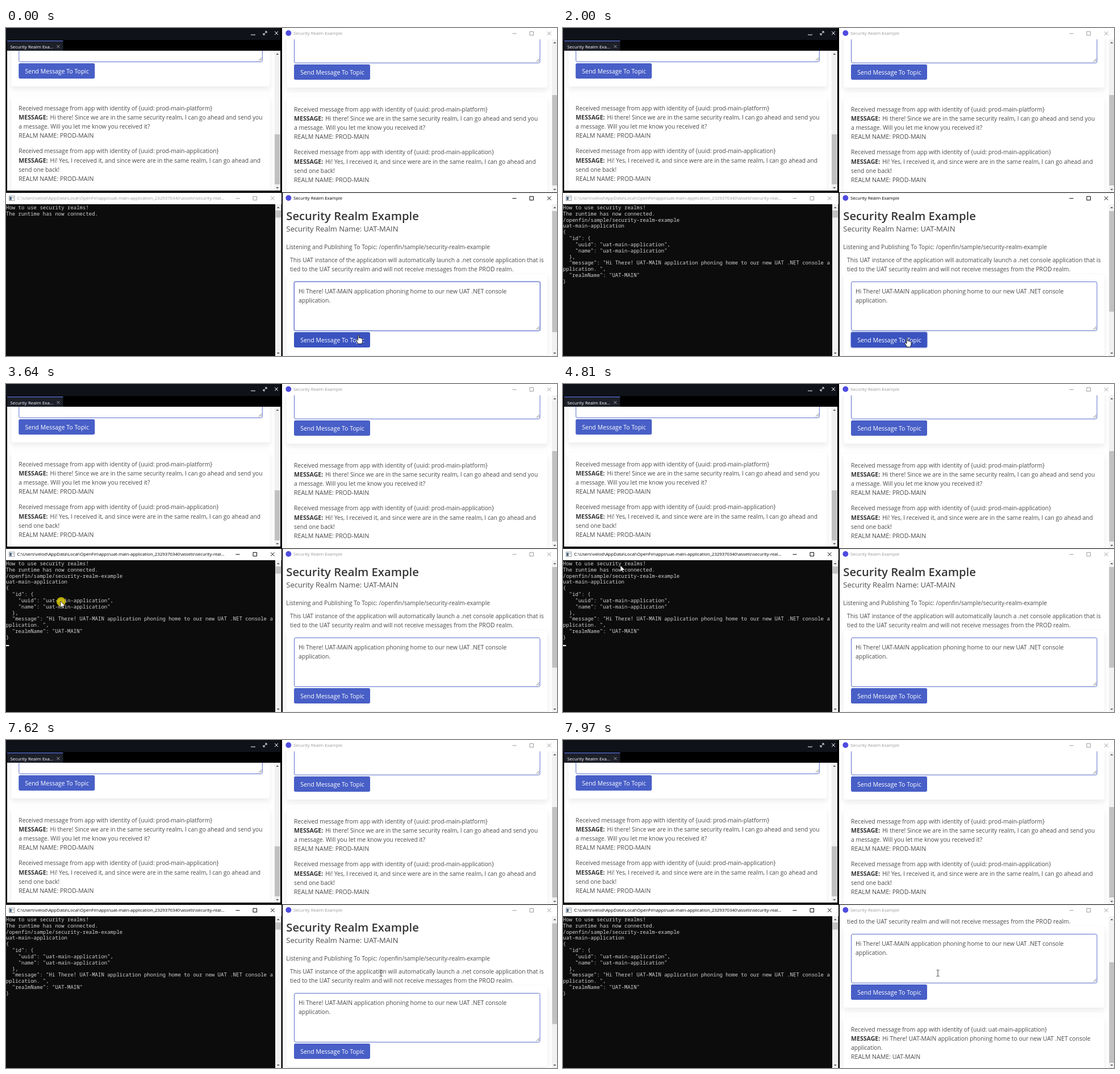
Animation, 970 px wide and 577 px high, one loop 8000 ms. Source, as an HTML page:

```html
<!DOCTYPE html>
<html lang="en">
<head>
<meta charset="utf-8">
<title>Security realms</title>
<style>
  html, body { margin: 0; width: 100%; height: 100%; overflow: hidden; background: #000; }
  svg { display: block; width: 100vw; height: 100vh; }
  text { font: 10.27px 'Open Sans', 'Noto Sans', sans-serif; font-variant-ligatures: none; fill: #4a4a4a; white-space: pre; }
  .wide { font-size: 10.4px; }
  .caps { font-size: 10.6px; }
  .strong { font-size: 10.6px; font-weight: 700; fill: #363636; }
  .h1 { font-size: 20.2px; font-weight: 600; fill: #363636; }
  .h2 { font-size: 13px; }
  .bar { font-size: 7.73px; }
  .tab { font-size: 7.9px; font-weight: 500; fill: #fff; }
  .label { font-size: 10.5px; fill: #fff; }
  .mono { font: 9px 'Noto Sans Mono', 'Liberation Mono', monospace; fill: #d2d2d2; }
  .card { fill: #fff; stroke: rgba(10,10,10,.02); filter: drop-shadow(0 5px 5px rgba(10,10,10,.08)); }
  .box { fill: #fff; stroke: #5a6fcd; }
  .line { fill: none; stroke-width: 1; }
</style>
</head>
<body>
<svg id="stage" viewBox="0 0 970 577"></svg>
<script>
const LOOP = 8000;
const SENT = 1000, ACTIVATE = 3370;
const stage = document.getElementById('stage');

const text = (x, y, s, cls = '') => `<text x="${x}" y="${y}" class="${cls}">${s}</text>`;
const rect = (x, y, w, h, fill, more = '') =>
  `<rect x="${x}" y="${y}" width="${w}" height="${h}" fill="${fill}" ${more}/>`;
const path = (d, more = '') => `<path d="${d}" ${more}/>`;
const clip = (id, x, y, w, h) => `<clipPath id="${id}">${rect(x, y, w, h, '#000')}</clipPath>`;

function scrollbar(x, w, top, bottom, thumbY, thumbH, id = '') {
  const c = x + w / 2;
  const arrow = (y, d) => path(`M${c - 2.5} ${y + d}h5l-2.5 ${-2.6 * d}z`, 'fill="#505050"');
  return rect(x, top, w, bottom - top, '#f1f1f1')
    + arrow(top + 6, 1) + arrow(bottom - 5, -1)
    + rect(x + .5, thumbY, w - 1, thumbH, '#c1c1c1', id && `id="${id}"`);
}

function controls(x, y) {
  return path(`M${x - 3.5} ${y + .5}h7M${x + 27} ${y - 3}h6.5v6.5h-6.5z`
    + `M${x + 58} ${y - 3}l6.5 6.5m0-6.5l-6.5 6.5`, 'class="line"');
}

function titleBar(id, x, y, w, title, icon, cx) {
  return rect(x, y, w, 20, '#fff') + icon
    + `<g id="${id}">${text(title[0], y + 12.4, title[1], 'bar')}${controls(cx, y + 9.3)}</g>`;
}

const realmBar = (id, x, y) => titleBar(id, x, y, 970 - x, [506, 'Security Realm Example'],
  `<circle cx="497.3" cy="${y + 9}" r="5" fill="#4f4ce0"/>`, 895);

function message(x, y, from, lines, realm) {
  const row = i => y + 16.2 * i;
  return text(x, row(0), `Received message from app with identity of {uuid: ${from}}`)
    + text(x, row(1), 'MESSAGE:', 'strong')
    + text(x + 55.3, row(1), lines[0], lines[2] || '')
    + text(x, row(2), lines[1])
    + text(x, row(3), `REALM NAME: ${realm}`, 'caps');
}

// Form card with the message card below; y is the top of the text area.
function form(x, y, w, content, ids = false) {
  const right = x + w, end = y + 86;
  return `<rect class="card" x="${x - 13}" y="${y - 13}" width="${w + 26}" height="143" rx="4"/>`
    + `<rect class="card" x="${x - 13}" y="${y + 147}" width="${w + 26}" height="230" rx="4"/>`
    + (ids ? rect(x, y, w, 86.5, 'none', 'id="areaRing" rx="2.5" stroke="#485fc7" stroke-opacity=".3" stroke-width="2.6"') : '')
    + `<rect class="box" x="${x + .5}" y="${y + .5}" width="${w - 1}" height="86" rx="2.5"/>`
    + path(`M${right - 7} ${end - 1.5}l5.5-5.5M${right - 4} ${end - 1.5}l2.5-2.5`, 'class="line" stroke="#777"')
    + rect(x, y + 89, 134, 27, '#485fc7', `rx="2.7" ${ids ? 'id="button"' : ''}`)
    + text(x + 11.2, y + 106.7, 'Send Message To Topic', 'label')
    + content;
}

const prodMessages = (x, y) =>
  message(x, y, 'prod-main-platform', [
    'Hi there! Since we are in the same security realm, I can go ahead and send you',
    'a message. Will you let me know you received it?'], 'PROD-MAIN')
  + message(x, y + 75.7, 'prod-main-application', [
    'Hi! Yes, I received it, and since were are in the same realm, I can go ahead and',
    'send one back!'], 'PROD-MAIN');

const platformWindow = () =>
  rect(0, 0, 483, 21, '#10121a') + rect(2, 22, 98.5, 18, '#1d1f29') + rect(2, 22, 98.5, 1.3, '#5a70d8')
  + text(7.5, 35.6, 'Security Realm Exa...', 'tab')
  + path('M89.5 30l5 5m0-5l-5 5', 'class="line" stroke="#bbb" style="stroke-width:.8"')
  + path('M431 12h8M473 6l6 6m0-6l-6 6M453 12l6-6M456 6h3v3M453 9v3h3', 'class="line" stroke="#fff"')
  + rect(2, 40, 481, 246, '#fff')
  + `<g clip-path="url(#cTL)">${form(22.3, -27, 429.5, prodMessages(22.3, 144.7))}</g>`
  + scrollbar(472.5, 10.5, 40, 286, 187, 88);

const appWindow = () =>
  rect(486, 20, 484, 269, '#fff')
  + `<g clip-path="url(#cTR)">${form(507, -25, 433.5, prodMessages(507, 146.7))}</g>`
  + scrollbar(961, 10, 20, 289, 118, 159)
  + realmBar('barTR', 486, 0);

const greeting = 'Hi There! UAT-MAIN application phoning home to our new UAT .NET console';

const uatWindow = () =>
  rect(487, 310, 483, 267, '#fff')
  + `<g clip-path="url(#cBR)"><g id="page">`
  + form(507, 446, 433.5,
      text(515, 466.5, greeting, 'wide') + text(515, 482.7, 'application.', 'wide')
      + rect(571.5, 472, 1, 13, '#333', 'id="caret"')
      + message(507, 617.7, 'uat-main-application', [greeting, 'application.', 'wide'], 'UAT-MAIN'), true)
  + text(493.3, 337.6, 'Security Realm Example', 'h1')
  + text(493.3, 358.2, 'Security Realm Name: UAT-MAIN', 'h2')
  + text(493.3, 389.2, 'Listening and Publishing To Topic: /openfin/sample/security-realm-example')
  + text(500, 412.2, 'This UAT instance of the application will automatically launch a .net console application that is')
  + text(500, 428.4, 'tied to the UAT security realm and will not receive messages from the PROD realm.')
  + `</g></g>`
  + scrollbar(961, 10, 310, 577, 322, 213, 'thumb')
  + realmBar('barBR', 487, 290);

const output = [
  '/openfin/sample/security-realm-example', 'uat-main-application', '{', '  "id": {',
  '    "uuid": "uat-main-application",', '    "name": "uat-main-application"', '  },',
  '  "message": "Hi There! UAT-MAIN application phoning home to our new UAT .NET console a',
  'pplication. ",', '  "realmName": "UAT-MAIN"', '}'];
const print = (lines, first) =>
  lines.map((s, i) => text(0, 319 + 10.83 * (i + first), s, 'mono')).join('');

const consoleWindow = () =>
  rect(0, 310, 474, 267, '#0c0c0c')
  + print(['How to use security realms!', 'The runtime has now connected.'], 0)
  + `<g id="output">${print(output, 2)}</g>`
  + rect(0, 459, 5.4, 2.2, '#f2f2f2', 'id="cursor"')
  + scrollbar(474, 10.5, 310, 577, 321, 12.5)
  + titleBar('barBL', 0, 290, 485,
      [19.5, String.raw`C:\Users\velod\AppData\Local\OpenFin\apps\uat-main-application_2329370340\assets\security-real...`],
      rect(5.5, 295.5, 9.5, 8, '#f4f4f4', 'stroke="#8a8f96" stroke-width=".8"')
      + rect(6.5, 297, 3.2, 5.5, '#3e5a78') + rect(10.5, 298, 3.5, 1, '#9aa'), 408);

const pointers =
  path('M0 0V17L4 13.2L6.6 19.2L9 18.2L6.5 12.3H12Z',
    'id="arrow" transform="scale(.68)" fill="#fff" stroke="#000"')
  + path('M6 1.5c0-2 3-2 3 0V8c.5-1.5 3-1 3 .5 .5-1.2 3-.8 3 .8 .7-1 3-.5 3 1.2V16c0 3-1.5 4-2 7H7c-.5-2-3.5-5.5-5.5-8.5C.5 12 3 11 4 12.5L6 14.5Z',
    'id="hand" transform="scale(.68) translate(-7.5)" fill="#fff" stroke="#000" stroke-width="1.3"')
  + path('M-2.5-5.3h1.6l.9.8l.9-.8h1.6M0-4.5V4.7M-2.5 5.5h1.6l.9-.8l.9.8h1.6',
    'id="beam" class="line" stroke="#444"');

stage.innerHTML =
  `<defs>${clip('cTL', 2, 40, 470.5, 246)}${clip('cTR', 486, 20, 475, 269)}${clip('cBR', 487, 310, 474, 267)}</defs>`
  + rect(0, 0, 970, 577, '#000')
  + platformWindow() + appWindow() + consoleWindow() + uatWindow()
  + `<g id="mouse"><circle id="press" cx="1" cy="1" r="8" fill="#e6d200" fill-opacity=".8"/>${pointers}</g>`;

// time, x, y, pointer shape
const track = [
  [0, 620.5, 540, 'hand'], [70, 620.5, 540, 'hand'], [340, 618.5, 546, 'hand'],
  [1990, 618.5, 546, 'hand'], [2000, 606.5, 546, 'hand'], [2070, 560, 511, 'beam'],
  [2150, 528, 485, 'beam'], [2400, 528, 485, 'arrow'], [2550, 254, 462, 'arrow'],
  [2740, 254, 462, 'arrow'], [3000, 165, 425, 'arrow'], [3370, 96, 382, 'arrow'],
  [3700, 96, 382, 'arrow'], [3950, 100, 358, 'arrow'], [4270, 98, 344, 'arrow'],
  [4530, 98, 344, 'arrow'], [4700, 101, 325, 'arrow'], [4810, 101, 319, 'arrow'],
  [5290, 101, 314, 'arrow'], [5490, 101, 314, 'arrow'], [5910, 122.5, 400, 'arrow'],
  [6060, 140, 410, 'arrow'], [6260, 130, 346, 'arrow'], [6330, 130, 346, 'arrow'],
  [6610, 170, 464, 'arrow'], [6870, 170, 464, 'arrow'], [6950, 466, 464, 'arrow'],
  [7210, 466, 464, 'beam'], [7290, 660, 410, 'beam'], [LOOP, 660, 410, 'beam']];

const el = {};
stage.querySelectorAll('[id]').forEach(n => el[n.id] = n);
const set = (id, name, value) => el[id].setAttribute(name, value);
const show = (id, on) => set(id, 'visibility', on ? 'visible' : 'hidden');
const within = (t, a, b) => t >= a && t < b;
const smooth = u => u * u * (3 - 2 * u);

function tint(id, active) {
  const color = active ? '#000' : '#999';
  set(id, 'style', `stroke:${color}`);
  el[id].querySelector('text').style.cssText = `stroke:none;fill:${color}`;
}

function movePointer(t) {
  const i = track.findIndex(k => k[0] > t);
  const [t0, x0, y0, shape] = track[i - 1], [t1, x1, y1] = track[i];
  const u = (t - t0) / (t1 - t0);
  set('mouse', 'transform', `translate(${x0 + (x1 - x0) * u} ${y0 + (y1 - y0) * u})`);
  for (const s of ['arrow', 'hand', 'beam']) show(s, s === shape);
  show('press', within(t, 870, 1070) || within(t, ACTIVATE, 3700));
}

function draw(t) {
  const uatActive = t < ACTIVATE;
  tint('barTR', false);
  tint('barBL', !uatActive);
  tint('barBR', uatActive);

  show('areaRing', t < 870);
  show('caret', within(t, 340, 870));
  set('button', 'fill', uatActive ? '#3a53c0' : '#485fc7');
  set('button', 'stroke', within(t, 870, ACTIVATE) ? 'rgba(72,95,199,.35)' : 'none');
  set('button', 'stroke-width', 3);
  set('button', 'paint-order', 'stroke');

  show('output', t >= SENT);
  show('cursor', t >= 3640 && Math.floor((t - 3640) / 545) % 2 === 0);

  const s = smooth(Math.min(1, Math.max(0, (t - 7600) / 370)));
  set('page', 'transform', `translate(0 ${-105 * s})`);
  set('thumb', 'y', 322 + 69 * s);
  set('thumb', 'height', t < SENT ? 213 : 177);
  movePointer(t);
}

const start = performance.now();
function tick() {
  draw((performance.now() - start) % LOOP);
  requestAnimationFrame(tick);
}
tick();
</script>
</body>
</html>
```
